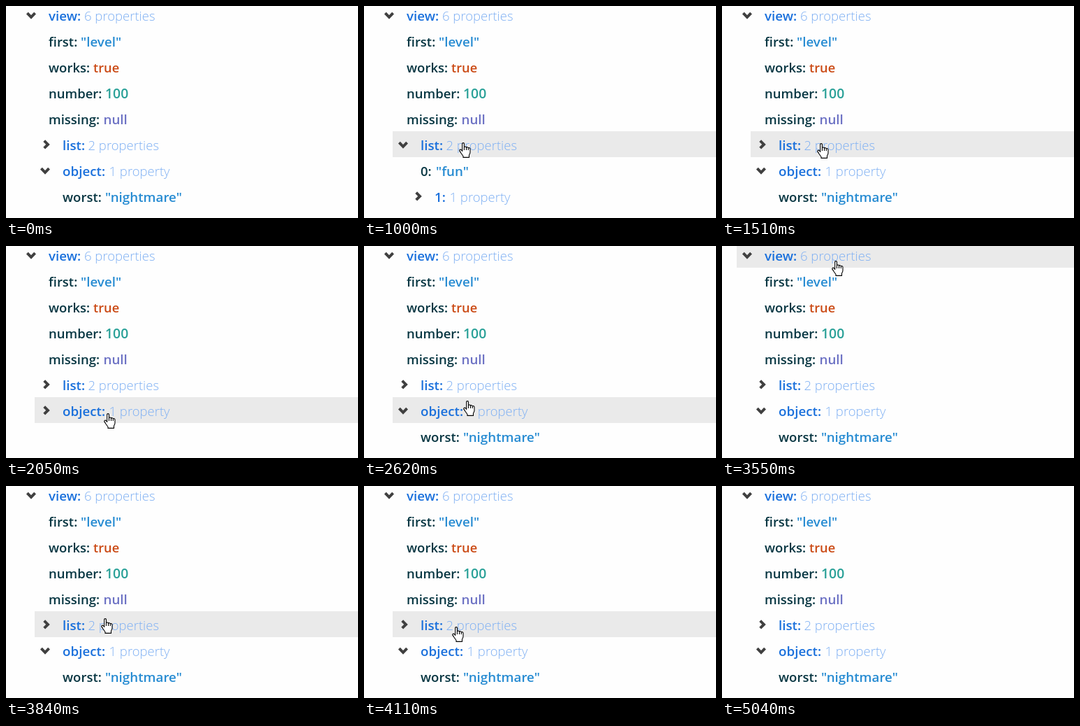
An HTML page for the animation above (5.35 s loop, 504x303 px).

```html
<!DOCTYPE html>
<html lang="en">
<head>
<meta charset="utf-8">
<title>Collapsible tree</title>
<style>
  html, body { margin: 0; width: 100%; height: 100%; overflow: hidden; background: #fefefe; }
  svg { display: block; }
  text { font: 600 18.8px "Open Sans", "Noto Sans", sans-serif; white-space: pre; }
  .key { fill: #073642; font-size: 18.5px; }
  .branch { fill: #1a70dc; }
  .string { fill: #268bd2; }
  .bool { fill: #cb4b16; font-size: 18.3px; }
  .number { fill: #2aa198; font-size: 19.4px; }
  .null { fill: #6c71c4; }
  .hint { fill: #7fb0f3; font-weight: 300; font-size: 18.5px; }
  .chevron { fill: none; stroke: #404040; stroke-width: 4; }
</style>
</head>
<body>
<svg width="504" height="303" viewBox="0 0 504 303">
  <rect id="hover" height="37" fill="#eaeaea"/>
  <g id="rows"></g>
  <g id="hand" fill="#fff" stroke="#000" stroke-width="1.1" stroke-linejoin="round">
    <path d="M4.7 2Q4.7 .6 6.1 .6T7.5 2V7Q8 5.8 9.2 6Q10.4 6.2 10.5 7.4Q11 6.4 12.1 6.7Q13.2 7 13.3 8.2Q14 7.4 15 7.8Q16 8.2 16 9.5V14Q16 16 14.5 18V21.4H6V19.5Q4.5 17.5 2.8 15Q1.8 13 .8 12Q.4 10.6 1.6 10.2Q2.8 9.8 3.6 11L4.7 12.5Z"/>
    <path d="M7.5 7V11M10.5 7.5V11M13.3 8.5V11" fill="none"/>
  </g>
  <path id="arrow" d="M.5 .5V16.5L4.2 13L6.6 18.5L9 17.5L6.7 12H11.5Z" fill="#fff" stroke="#000"/>
  <path id="beam" d="M0 .5H3M4 .5H7M3.5 1V15M0 15.5H3M4 15.5H7" fill="none" stroke="#000"/>
</svg>
<script>
const LOOP = 5350, PITCH = 37, TOP = -6;
const $ = id => document.getElementById(id);

// x: key position, vx: value position, inside: branches that must be open
const tree = [
  { id: 'view', x: 61, vx: 112, value: '6 properties', kind: 'hint', inside: [] },
  { id: 'first', x: 61, vx: 107, value: '"level"', kind: 'string', inside: ['view'] },
  { id: 'works', x: 61, vx: 125, value: 'true', kind: 'bool', inside: ['view'] },
  { id: 'number', x: 61, vx: 142, value: '100', kind: 'number', inside: ['view'] },
  { id: 'missing', x: 61, vx: 139.5, value: 'null', kind: 'null', inside: ['view'] },
  { id: 'list', x: 81, vx: 117.5, value: '2 properties', kind: 'hint', inside: ['view'] },
  { id: '0', x: 81, vx: 103, value: '"fun"', kind: 'string', inside: ['view', 'list'] },
  { id: '1', x: 101, vx: 122.5, value: '1 property', kind: 'hint', inside: ['view', 'list'] },
  { id: 'object', x: 81, vx: 147.5, value: '1 property', kind: 'hint', inside: ['view'] },
  { id: 'worst', x: 81, vx: 142, value: '"nightmare"', kind: 'string', inside: ['view', 'object'] }
];

// time, pointer shape, x, y, hovered branch, branch toggled
const steps = [
  [0],
  [280, 'arrow', 250, 0],
  [410, 'arrow', 179, 85],
  [560, 'hand', 140, 184, 'list'],
  [690, 'hand', 136, 189, 'list'],
  [850, 'hand', 136, 195, 'list'],
  [1000, 'hand', 136, 195, 'list', 'list'],
  [1260, 'hand', 136, 196, 'list'],
  [1510, 'hand', 136, 196, 'list', 'list'],
  [1640, 'hand', 139, 231, 'object'],
  [1780, 'hand', 139, 235, 'object'],
  [1910, 'hand', 140, 239, 'object'],
  [2050, 'hand', 140, 239, 'object', 'object'],
  [2620, 'hand', 142, 221, 'object', 'object'],
  [2760, 'beam', 153, 112],
  [2890, 'hand', 158, 26, 'view'],
  [3030, 'hand', 158, 25, 'view'],
  [3180, 'hand', 158, 25, 'view', 'view'],
  [3300, 'hand', 157, 22, 'view'],
  [3430, 'hand', 157, 21, 'view'],
  [3550, 'hand', 157, 21, 'view', 'view'],
  [3690, 'beam', 150, 89],
  [3840, 'hand', 136, 189, 'list'],
  [3960, 'hand', 126, 221, 'object'],
  [4110, 'hand', 126, 201, 'list'],
  [4240, 'hand', 127, 199, 'list'],
  [4380, 'hand', 127, 199, 'list', 'list'],
  [4760, 'hand', 127, 199, 'list', 'list'],
  [4910, 'arrow', 418, 284],
  [5040]
];

function add(parent, tag, attrs, content) {
  const el = document.createElementNS('http://www.w3.org/2000/svg', tag);
  for (const name in attrs) el.setAttribute(name, attrs[name]);
  if (content) el.textContent = content;
  return parent.appendChild(el);
}

for (const row of tree) {
  const branch = row.kind === 'hint';
  row.g = add($('rows'), 'g', {});
  add(row.g, 'text', { x: row.x, y: 27, class: branch ? 'branch' : 'key' }, row.id + ':');
  add(row.g, 'text', { x: row.vx, y: 27, class: row.kind }, row.value);
  if (branch) row.chevron = add(row.g, 'path', { class: 'chevron' });
}

function chevronPath(x, open) {
  return open
    ? `M${x - 30.6} 16.2l5.6 5.6l5.6 -5.6`
    : `M${x - 26.3} 13.6l5.3 5.3l-5.3 5.3`;
}

function draw(ms) {
  const open = { view: true, list: false, object: true };
  let now = steps[0];
  for (const step of steps) {
    if (step[0] > ms) break;
    now = step;
    if (step[5]) open[step[5]] = !open[step[5]];
  }
  const [, shape, px, py, hovered] = now;

  $('hover').style.display = hovered ? '' : 'none';
  let y = TOP;
  for (const row of tree) {
    const shown = row.inside.every(id => open[id]);
    row.g.style.display = shown ? '' : 'none';
    if (!shown) continue;
    row.g.setAttribute('transform', `translate(0 ${y})`);
    if (row.chevron) row.chevron.setAttribute('d', chevronPath(row.x, open[row.id]));
    if (row.id === hovered) {
      $('hover').setAttribute('x', row.x - 40);
      $('hover').setAttribute('y', y);
      $('hover').setAttribute('width', 544 - row.x);
    }
    y += PITCH;
  }

  for (const id of ['hand', 'arrow', 'beam']) {
    $(id).style.display = id === shape ? '' : 'none';
    if (id === shape) $(id).setAttribute('transform', `translate(${px} ${py})`);
  }
}

const start = performance.now();
function tick() {
  draw((performance.now() - start) % LOOP);
  requestAnimationFrame(tick);
}
tick();
</script>
</body>
</html>
```
